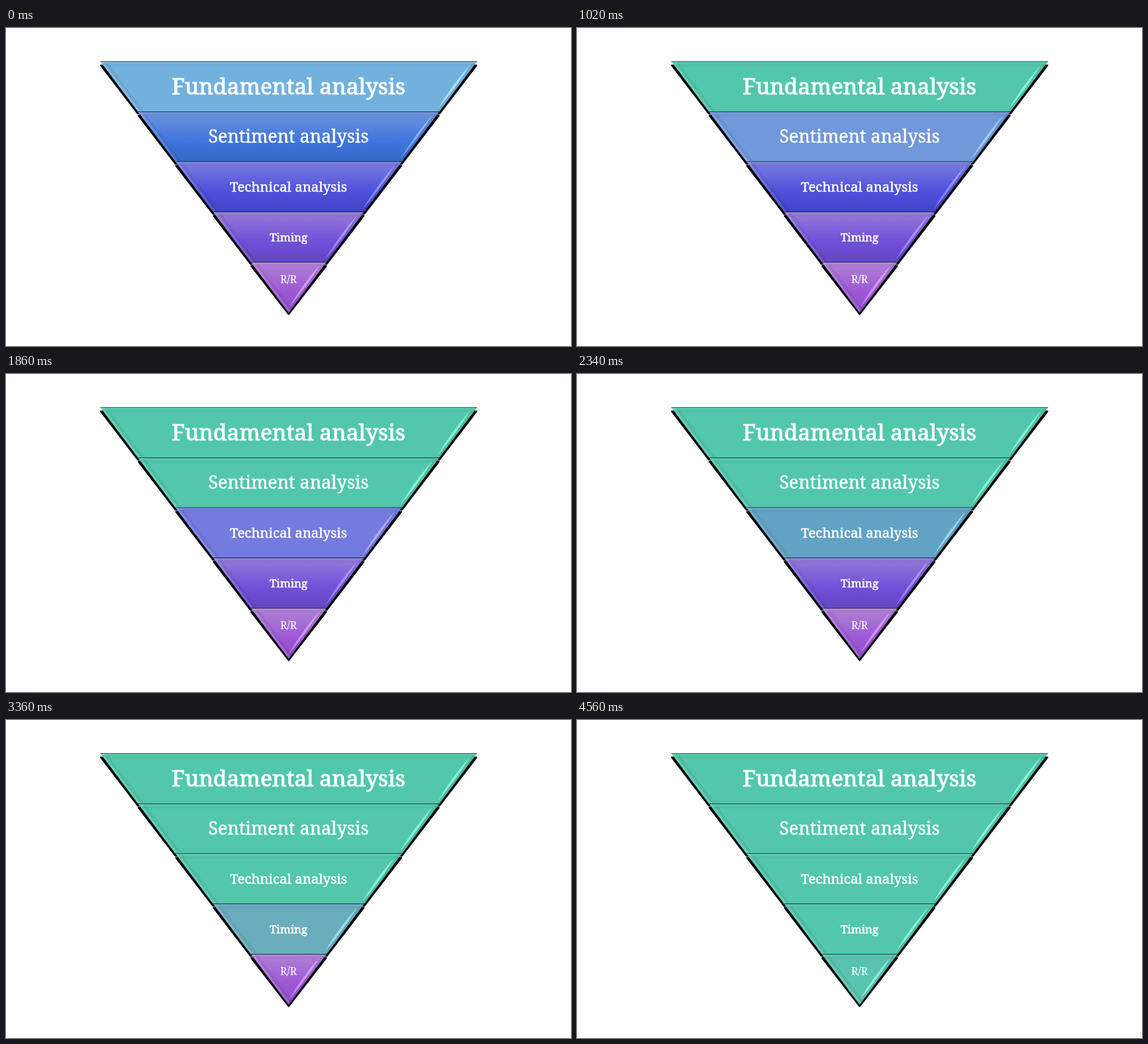
Animation of 853 by 480 pixels, one loop 4.62 s. Source, as an HTML page:

```html
<!DOCTYPE html>
<html lang="en">
<head>
<meta charset="utf-8">
<title>Analysis funnel</title>
<style>
  html, body { margin: 0; width: 100%; height: 100%; overflow: hidden; background: #fff; }
  svg { display: block; width: 853px; height: 480px; }
  text { font-family: Rockwell, "Noto Serif", serif; fill: #fff; stroke: #fff; text-anchor: middle; }
  .shine { fill: #2e2e2e; mix-blend-mode: color-dodge; }
  .soft { filter: blur(1.2px); }
</style>
</head>
<body>
<svg id="stage" viewBox="0 0 853 480"></svg>
<script>
const LOOP = 4620, STEPS = 77;
const TOP = 50.5, STEP = 75.7, HEIGHT = 379.5, MID = 426.75, HALF = 284.5;
const DONE = 'rgb(82,199,171)';

// label, font size, baseline, outline, gradient stops, solid starting colour
const bands = [
  ['Fundamental analysis', 33.5, 100, 1, ['#72b1de', '#72b1de', '#72b1de'], 'rgb(114,177,222)'],
  ['Sentiment analysis', 26.9, 173, .5, ['#7094de', '#3f75dc', '#3468c8'], 'rgb(116,146,224)'],
  ['Technical analysis', 20.4, 247, .5, ['#7a7ede', '#4e50db', '#3f44c6'], 'rgb(116,122,224)'],
  ['Timing', 16.9, 322, .6, ['#937bd9', '#7050d8', '#6246c2'], 'rgb(147,128,217)'],
  ['R/R', 15.7, 385, .1, ['#b082d6', '#9c58d4', '#8e4eca'], 'rgb(172,131,213)']
];

const stage = document.getElementById('stage');
const half = y => HALF * (TOP + HEIGHT - y) / HEIGHT;
const left = y => MID - half(y);
const right = y => MID + half(y);

function add(parent, tag, attrs) {
  const el = document.createElementNS('http://www.w3.org/2000/svg', tag);
  for (const key in attrs) el.setAttribute(key, attrs[key]);
  return parent.appendChild(el);
}

const poly = (parent, points, attrs) =>
  add(parent, 'polygon', { points: points.map(p => p.join()).join(' '), ...attrs });

const limits = i => {
  const y0 = TOP + i * STEP;
  return [y0, i === 4 ? TOP + HEIGHT : y0 + STEP];
};

const outline = (y0, y1) =>
  [[left(y0), y0], [right(y0), y0], [right(y1), y1], [left(y1), y1]];

function drawShadow(i) {
  const [y0, y1] = limits(i), drop = i === 4 ? 2 : 3;
  poly(stage, [
    [left(y0) + 1, y0 + 6], [right(y0) - 1, y0 + 6],
    [right(y1), y1 + drop], [left(y1), y1 + drop]
  ], { fill: '#000', stroke: '#000', 'stroke-width': 2.5, 'stroke-linejoin': 'round' });
}

// Slanted strip inside one edge, between two horizontal insets
const strip = (edge, sign, y0, y1, a, b) => [
  [edge(y0) + sign * a, y0], [edge(y0) + sign * b, y0],
  [edge(y1) + sign * b, y1], [edge(y1) + sign * a, y1]
];

function drawBevel(g, i, y0, y1) {
  const w = right(y0) - left(y0);
  poly(g, strip(left, 1, y0, y1, 0, 4.5), { fill: '#fff', opacity: .12 });
  poly(g, strip(left, 1, y0 + 4, y1, 5, 9), { opacity: .08, class: 'soft' });
  poly(g, strip(right, -1, y0, y1, 0, 4), { opacity: .06 });
  add(g, 'rect', { x: left(y0), y: y0 + 1, width: w, height: 2, fill: '#fff', opacity: .05 });
  add(g, 'rect', { x: left(y0), y: y0 + 4, width: w, height: 3, opacity: .04, class: 'soft' });

  const ya = y0 + 5, yb = y1 - (i === 4 ? 8 : 4), ym = (ya + yb) / 2;
  const xa = right(ya) - 7, xb = right(yb) - 5.5, xm = (xa + xb) / 2;
  const d = `M${xa} ${ya}Q${xm - 5} ${ym} ${xb} ${yb}Q${xm + 4} ${ym} ${xa} ${ya}Z`;
  add(g, 'path', { d, class: 'shine' });
  add(g, 'path', { d, fill: '#fff', opacity: .22 });
}

function drawBand([label, size, base, weight, stops, start], i) {
  const [y0, y1] = limits(i), shape = outline(y0, y1);
  const defs = add(stage, 'defs', {});
  const grad = add(defs, 'linearGradient', { id: 'fill' + i, x1: 0, y1: 0, x2: 0, y2: 1 });
  stops.forEach((c, k) => add(grad, 'stop', { offset: [0, .6, 1][k], 'stop-color': c }));
  poly(add(defs, 'clipPath', { id: 'clip' + i }), shape, {});

  const g = add(stage, 'g', { 'clip-path': `url(#clip${i})` });
  poly(g, shape, { fill: `url(#fill${i})` });
  const solid = poly(g, shape, {});
  drawBevel(g, i, y0, y1);

  const y = Math.floor(y0) + .5;
  add(stage, 'line', {
    x1: left(y0), x2: right(y0), y1: y, y2: y, stroke: '#082434', 'stroke-opacity': .68
  });
  add(stage, 'text', { x: 426.5, y: base, 'font-size': size, 'stroke-width': weight })
    .textContent = label;

  // Each band turns solid when its fifth of the loop begins, then blends to green
  const key = (offset, fill, fillOpacity) => ({ offset, fill, fillOpacity });
  solid.animate([
    key(0, start, 0), key(i / 5, start, 0), key(i / 5, start, 1),
    key((i + 1) / 5, DONE, 1), key(1, DONE, 1)
  ], { duration: LOOP, iterations: Infinity, easing: `steps(${STEPS})` });
}

bands.forEach((_, i) => drawShadow(i));
bands.forEach(drawBand);
</script>
</body>
</html>
```
